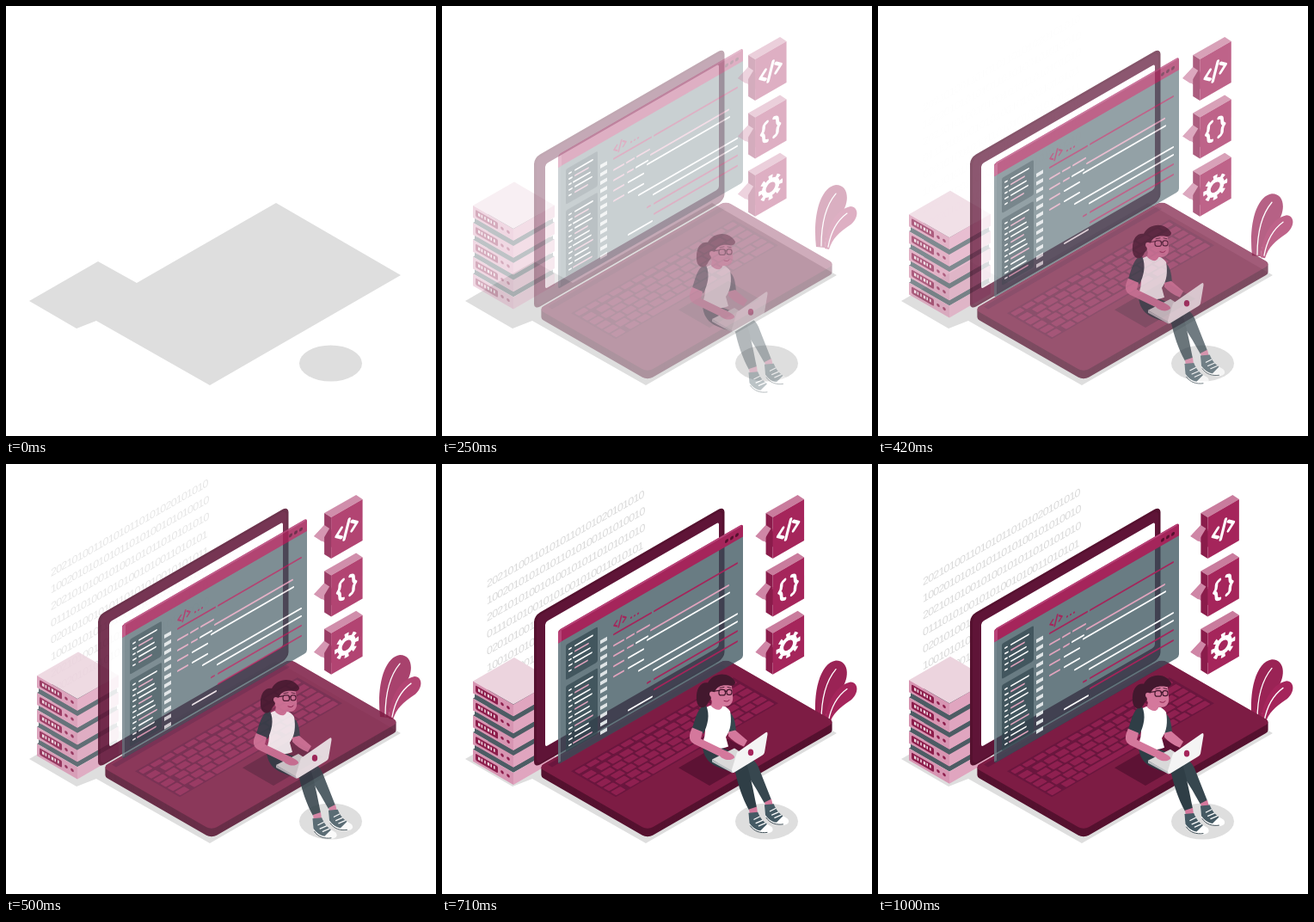
Write an HTML page that moves like this. It is 500 px wide and 500 px high and loops after 1040 ms.

```html
<!DOCTYPE html>
<html lang="en">
<head>
<meta charset="utf-8">
<title>Coding scene</title>
<style>
  html, body { margin: 0; width: 100%; height: 100%; overflow: hidden; background: #fff; }
  svg { display: block; width: 100vw; height: 100vh; }
  .digits { font: 12.5px "Liberation Sans", Arial, sans-serif; letter-spacing: -.8px; fill: #d9d9d9; }
</style>
</head>
<body>
<svg id="stage" viewBox="0 0 500 500"></svg>
<script>
const WINE = '#7d1c44', DARK = '#55112f', CRIMSON = '#a5255b', ROSE = '#e2a4be',
      PALE = '#ecd4de', TEAL = '#37474f', SKIN = '#d4789c', HAIR = '#43182e';

// Isometric planes: wall rising right, wall falling right, floor
const wallUp = (x, y) => `matrix(1 -.577 0 1 ${x} ${y})`;
const wallDown = (x, y) => `matrix(1 .577 0 1 ${x} ${y})`;
const floor = (x, y) => `matrix(1 -.577 1 .577 ${x} ${y})`;

const rect = (x, y, w, h, fill, more = '') =>
  `<rect x="${x}" y="${y}" width="${w}" height="${h}" fill="${fill}" ${more}/>`;
const poly = (points, fill) => `<polygon points="${points}" fill="${fill}"/>`;
const path = (d, fill, more = '') => `<path d="${d}" fill="${fill}" ${more}/>`;
const line = (d, color, width, more = '') =>
  path(d, 'none', `stroke="${color}" stroke-width="${width}" stroke-linecap="round" stroke-linejoin="round" ${more}`);
const bar = (x1, x2, y, color, width = 2) => line(`M${x1} ${y}H${x2}`, color, width);
const dot = (x, y, r, fill) => `<circle cx="${x}" cy="${y}" r="${r}" fill="${fill}"/>`;
const group = (transform, body) => `<g transform="${transform}">${body}</g>`;
const repeat = (n, make) => Array.from({ length: n }, (_, i) => make(i)).join('');

const codeIcon = (color, width) =>
  line('M-6 -5L-12 1L-6 6M6 -6L12 -1L6 5M3 -10L-3 10', color, width);

function shadows() {
  return poly('27,343 107,297 152,322 314,229 459,313 237,441 105,366 82,375', '#dedede') +
    '<ellipse cx="377.5" cy="415.5" rx="36.5" ry="21" fill="#dedede"/>';
}

function digits() {
  const rows = ['202101001101010110101020101010', '100201010101011010100101010010',
    '202101010010100101011010101010', '011101010010101001010011010101',
    '020101001010110101010010101011', '100101010110100101011010100101'];
  return repeat(8, i =>
    `<text class="digits" transform="${wallUp(52, 139 + i * 19.6)}">${rows[i % rows.length]}</text>`);
}

function server(level) {
  const front = rect(0, 0, 47, 14, '#d795b2') +
    rect(3, 3, 26, 8, '#8c1d4b', 'rx="1.5"') +
    repeat(6, i => rect(6 + i * 3.6, 5, i % 3 ? 1.6 : 2.4, 3.5, PALE)) +
    dot(34, 7, 1.8, '#8c1d4b') + dot(41, 7, 1.8, '#8c1d4b');
  return group(`translate(0 ${level * 19.8})`,
    poly('36,250 84,222.500 131,250 83,277', level ? '#4d5c64' : PALE) +
    group(wallDown(36, 250), front) +
    group(wallUp(83, 277.1), rect(0, 0, 48, 14, '#e0a5bf')) +
    poly('38,265 83,291 129,265 129,269 83,295 38,269', level < 4 ? '#4d5c64' : 'none'));
}

const servers = () => [4, 3, 2, 1, 0].map(server).join('');

function plant() {
  return path('M435 298C431 264 439 229 458 226C475 226 474 250 462 262C452 273 446 285 445 299Z', '#9a2355') +
    path('M445 300C446 277 457 255 475 251C486 252 484 266 474 273C462 281 454 288 450 301Z', CRIMSON) +
    line('M441 297C441 271 447 249 458 236M449 298C452 281 460 267 471 259', '#fff', 1.3);
}

function keyboard() {
  const rows = repeat(6, r => repeat(14, c => {
    if (r === 5 && c > 3 && c < 9) return c === 4 ? rect(68, 66, 65, 6.5, '#8f2050', 'rx="1"') : '';
    const shift = r % 2 && c && c < 13 ? 3 : 0;
    return rect(15 + c * 13.3 + shift, 24 + r * 8.4, 11.2, r ? 6.6 : 5.4, '#8f2050', 'rx="1"');
  }));
  return rect(13, 22, 189, 52, '#6a163e') + rows + rect(79, 81, 58, 36, '#5d1234');
}

function laptop() {
  const lid = rect(0, 0, 221.5, 177, DARK, 'rx="7"') +
    rect(3, 3, 216, 172, '#5f1437', 'rx="6"') +
    rect(13, 15, 202, 145, '#fff', 'rx="3"');
  const slab = repeat(10, i =>
    group(floor(112, 362 - i), rect(0, 0, 218, 127, DARK, 'rx="6"')));
  return group(wallUp(107, 176.5), lid) + slab +
    group(floor(112, 352.5), rect(0, 0, 218, 127, WINE, 'rx="6"') +
      rect(8, 3, 202, 5, '#6a163e')) +
    group(floor(115, 352), keyboard());
}

function sidePanel(top, height, count) {
  return rect(9, top, 37, height, '#33474f', 'rx="2" fill-opacity=".7"') +
    repeat(count, i => {
      const y = top + 7 + i * 6.4, color = i % 3 === 1 ? ROSE : '#fff';
      return bar(13, 15 + i % 2, y, '#fff', 1.8) +
        bar(i % 4 === 2 ? 18 : 20, 40 - (i * 5) % 7, y, color, 1.8);
    });
}

function editor() {
  const lines = [
    [65, 108, 42, CRIMSON], [112, 208, 42, CRIMSON],
    [65, 76, 55, ROSE], [80, 88, 55, ROSE], [92, 106, 55, ROSE],
    [65, 76, 67, ROSE], [81, 87, 67, ROSE], [91, 104, 67, '#fff'], [108, 198, 62, ROSE],
    [65, 76, 79, ROSE], [82, 99, 79, '#fff'], [104, 199, 71, '#fff'],
    [65, 76, 91, ROSE], [82, 99, 91, '#fff'],
    [94, 208, 101, '#fff'], [111, 208, 110, '#fff'],
    [104, 107, 121, CRIMSON], [112, 208, 121, CRIMSON], [112, 208, 133, CRIMSON],
    [82, 109, 140, '#fff']
  ];
  return group(wallUp(135, 191),
    rect(0, 10, 215, 146, '#37505a', 'rx="3" fill-opacity=".75"') +
    rect(0, 12, 3, 142, '#839199', 'fill-opacity=".5"') +
    path('M0 15V3Q0 0 3 0H212Q215 0 215 3V15Z', CRIMSON) +
    rect(2, 0, 211, 2, '#b84478') + rect(0, 2, 4, 13, '#b84478') +
    [196, 202, 208].map(x => dot(x, 9, 2, DARK)).join('') +
    sidePanel(22, 41, 5) + sidePanel(70, 77, 11) +
    repeat(12, i => rect(49, 40 + i * 9.6, 8, 4.2, '#dfe4e6')) +
    group('translate(72 31) scale(.58)', codeIcon(CRIMSON, 3)) +
    [85, 89, 93].map(x => dot(x, 34, 1.1, CRIMSON)).join('') +
    lines.map(l => bar(...l)).join(''));
}

function bubble(index) {
  const half = 'M-4 -11C-8 -10 -8 -8 -8 -5C-8 -2 -9 -1 -10.500 0C-9 1 -8 2 -8 5C-8 8 -8 10 -4 11';
  const icons = [
    codeIcon('#fff', 3.6),
    line(half, '#fff', 3.6) + group('scale(-1 1)', line(half, '#fff', 3.6)),
    '<circle r="8" fill="none" stroke="#fff" stroke-width="5"/>' +
      '<circle r="11.7" fill="none" stroke="#fff" stroke-width="4.6" pathLength="160" stroke-dasharray="10 10" stroke-dashoffset="5"/>'
  ];
  return group(`translate(0 ${index * 67.4})`,
    poly('362,84 374,71 383,76 374,91', '#cf86a6') +
    poly('374,91 383,76 383,97', '#8a1c4b') +
    poly('374,57 411,36 418.5,41 382,62', '#c97c9d') +
    poly('374,57 382,62 382,110 374,105', '#8a1c4b') +
    poly('382,62 418.5,41 418.5,89 382,110', CRIMSON) +
    poly('362,84 374,71 380,75 371,90', '#cf86a6') +
    group(wallUp(400, 76), icons[index]));
}

const bubbles = () => repeat(3, bubble);

function shoe(x, y) {
  return group(`translate(${x} ${y}) scale(1.08)`,
    path('M-1 -1L9 -2C12 5 17 9 24 13C27 17 24 20 17 20C9 20 4 16 0 10Z', '#fff') +
    path('M-1 -2L9 -3C12 4 15 7 19 10L12 17C6 16 3 13 0 9Z', '#455a64') +
    line('M5 5L11 2M7 9L14 6M10 12L17 9', '#fff', 1.1) +
    line('M1 12C5 18 12 20 19 19', TEAL, .9));
}

function girl() {
  const legs = path('M345 345C356 341 364 346 368 355L383 393L375 397C367 383 359 368 349 357Z', TEAL) +
    path('M303 331C312 328 336 332 353 348C358 361 362 382 366 402L357 405C349 391 344 374 341 361C321 356 305 352 303 331Z', '#2f3e46') +
    poly('375,396 383,392 385,400 377,402', SKIN) + poly('357,404 366,401 367,409 358,411', SKIN);
  const body = path('M334 291C340 295 341 303 342 314L333 317Z', TEAL) +
    path('M333 314L341 312L355 324L351 331C343 328 337 323 333 319Z', SKIN) +
    path('M304 289C309 281 328 279 335 290C337 301 336 312 330 320L333 331C322 336 309 332 302 329C309 315 305 302 304 289Z', '#fff') +
    path('M314 277L326 279L326 285C323 291 317 288 313 284Z', SKIN) +
    path('M307 283C298 284 295 297 291 310L304 316C309 306 312 294 307 283Z', '#2f3e46') +
    path('M291 309L303 314L301 322L330 336C335 339 341 341 340 344C336 348 330 346 324 343L293 328C286 324 287 317 291 309Z', SKIN);
  const head = path('M312 260C317 254 332 254 337 261L338 272C339 277 337 285 329 284C321 286 313 280 312 274Z', SKIN) +
    path('M310 279C306 289 297 287 296 277C295 263 301 256 309 257C315 245 334 243 341 256C341 260 337 261 334 260C326 259 319 261 317 268C314 266 311 269 313 275Z', HAIR) +
    dot(314, 270, 3, SKIN) +
    line('M315 267L322 266M329 267H331', HAIR, 1.1) +
    '<g fill="none" stroke="#43182e" stroke-width="1.2">' +
    '<rect x="322" y="265" width="7.5" height="6.5" rx="2.5"/><rect x="331" y="265" width="6" height="6" rx="2.4"/></g>' +
    line('M328 278C331 279 333 279 334 277', '#8b1f4c', 1) +
    line('M323 263L328 262M332 262L336 263', HAIR, .9);
  const computer = poly('314,346 340,333 362,347 338,361', '#d9d9d9') +
    path('M321 340L330 336C335 339 341 341 340 344C336 348 330 347 325 344Z', SKIN) +
    path('M343 338L376 315Q379 313 378.500 317L375 338Q374.500 340 372 341.500L340 361Q336 363 337 358Z', '#f4f4f4') +
    poly('314,346 337,359 338,362 314,349', '#b9bec1') +
    '<ellipse cx="359" cy="338" rx="3.2" ry="3.8" fill="#a5255b"/>';
  return legs + shoe(376, 401) + shoe(357.5, 410.5) + body + head + computer;
}

// Each layer: drawing, slide direction
const layers = [
  [digits, 0, 2], [servers, 0, 1], [plant, 0, 1], [laptop, 0, 0],
  [editor, 0, 1], [bubbles, 1, 0], [girl, 0, -1]
];
const stage = document.getElementById('stage');
stage.innerHTML = shadows() + layers.map(([draw]) => `<g class="layer">${draw()}</g>`).join('');
const nodes = stage.querySelectorAll('.layer');

const LOOP = 1040, STEP = 41.6, SLIDE = 30.5;
// Entrance progress by step, overshooting before it settles
const curve = [[0, 0], [4, .25], [8, .575], [10, .745], [14, 1], [17, 1.085], [20, 1.115], [22, 1.09], [24, 1.045], [25, 1]];

function progress(step) {
  const i = curve.findIndex(([s], k) => k && step <= s);
  const [s0, p0] = curve[i - 1], [s1, p1] = curve[i];
  return p0 + (p1 - p0) * (step - s0) / (s1 - s0);
}

function render(now) {
  const step = Math.min(24, Math.floor((now % LOOP + 4) / STEP));
  const p = progress(step), d = SLIDE * (p - 1);
  layers.forEach(([draw, dx, dy], i) => {
    const fade = draw === digits ? (p - .74) / .2 : p ** 1.15;
    nodes[i].setAttribute('transform', `translate(${dx * d} ${dy * d})`);
    nodes[i].setAttribute('opacity', Math.max(0, Math.min(1, fade)));
  });
}

const start = performance.now();
function tick() {
  render(performance.now() - start);
  requestAnimationFrame(tick);
}
tick();
</script>
</body>
</html>
```
